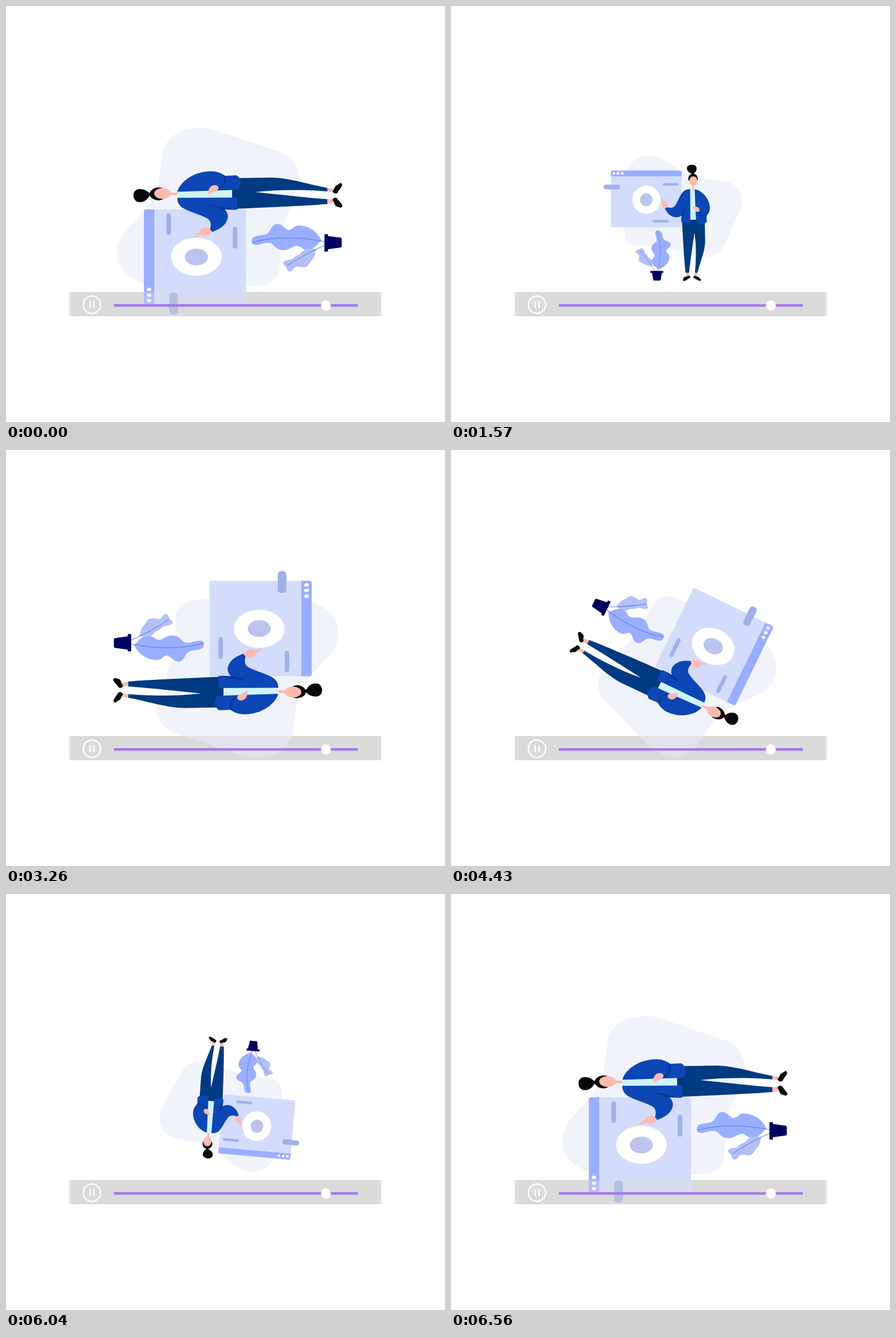
These frames come from a looping animation (761 by 720 pixels, 7650 ms). An HTML page:

```html
<!DOCTYPE html>
<html lang="en">
<head>
<meta charset="utf-8">
<title>Turning illustration</title>
<style>
  html, body { margin: 0; width: 100%; height: 100%; overflow: hidden; background: #fefefe; }
  svg { display: block; width: 761px; height: 720px; }
</style>
</head>
<body>
<svg viewBox="0 0 761 720">
  <rect x="109" y="495" width="543" height="42" fill="#efefef"/>
  <rect x="111" y="495" width="539" height="42" fill="#d9d9d9"/>

  <!-- Drawn lying on its left side, at full size -->
  <g id="scene">
    <path fill="#edf0f9" fill-opacity=".7" d="M272 253C278 224 305 211 337 211C352 211 362 215 374 219L475 253C500 262 509 280 508 303C504 325 480 372 476 405C474 425 475 440 474 453C473 475 456 485 430 485H260C225 482 193 460 193 428C193 405 204 393 216 380C240 355 262 330 266 295Z"/>

    <g id="window">
      <rect x="239" y="352" width="177" height="165" rx="4" fill="#d3dcfb"/>
      <path fill="#9aaeff" d="M257 352V517H243Q239 517 239 513V356Q239 352 243 352Z"/>
      <g fill="#fff">
        <ellipse cx="248" cy="490.5" rx="4" ry="3"/>
        <ellipse cx="248" cy="500.5" rx="4" ry="3"/>
        <ellipse cx="248" cy="510" rx="4" ry="3"/>
        <ellipse cx="330" cy="434" rx="44" ry="33"/>
      </g>
      <ellipse cx="330" cy="434.5" rx="20" ry="14.5" fill="#bbc4ec"/>
      <g fill="#9fb1e6">
        <rect x="278" y="359" width="8" height="37" rx="4"/>
        <rect x="393" y="382" width="8" height="38" rx="4"/>
        <rect x="283" y="496" width="15" height="38" rx="6"/>
      </g>
    </g>

    <g id="plant">
      <path fill="#9aaeff" d="M547 406C542 395 529 380 507 380C498 380 498 387 490 388C483 387 479 377 469 377C461 379 460 386 456 391C449 399 436 395 428 401C425 405 425 411 429 413C439 415 444 410 454 410C465 409 465 422 480 422.500C493 423 495 415 504 415C511 415 514 423 524 422C535 421 539 412 547 406Z"/>
      <path fill="#b3c0f6" d="M538 421C526 418 516 421 512 427C508 432 503 430 498 437C492 440 482 439 480 445C482 449 486 449 487 456C490 462 496 460 499 454C505 448 510 453 517 452C525 451 525 445 529 441C535 436 536 428 538 421Z"/>
      <path fill="none" stroke="#5474e0" d="M427 409Q482 394 553 408M487 450Q520 428 553 414"/>
      <path fill="#00005f" d="M552 395H558V398L580 401Q582 401 582 404V415Q582 418 580 418L558 421V425H552Z"/>
    </g>

    <g id="person">
      <path fill="#003a80" d="M392 298L460 297C490 297 525 309 558 315V321C520 318 475 317 432 322C470 326 515 331 558 334.500V342.500C535 345 480 347.500 398 351L392 340Z"/>
      <path fill="#ffb9b0" d="M557 315L568 316V322L557 321ZM557 335L568 334V341L557 342ZM284 323H299V327.5H284Z"/>
      <path fill="#080808" d="M566 320C570 318 569 311 574 310L580 306Q584 308 582 312L574 324Q568 326 566 320ZM566 336C570 339 568 344 573 347L580 349Q585 348 582 343L573 332Q567 331 566 336Z"/>

      <path fill="#080808" d="M221 328C221 320 227 316 234 317C241 317 245 321 249 324C251 317 258 314 266 314C272 314 276 317 276 325C276 333 272 336 264 336.500C257 336 252 333 249 328C246 333 242 339 233 339.500C226 340 221 335 221 328Z"/>
      <ellipse cx="271.500" cy="324.500" rx="14.500" ry="9.500" fill="#ffb9b0"/>

      <path fill="#d0f2fa" d="M297 321L392 318V333H297Z"/>
      <path fill="#0d47b5" d="M297 321.500C303 301 330 286 355 286C366 286 374 289 379 294L399 293C407 297 410 308 403 317L392 318.500Z"/>
      <path fill="#0d47b5" d="M297 332L401 331.500V352.500L377 350C384 356 386 363 384 369C380 381 369 387 357 391L353 388C357 377 355 370 346 366C334 360 320 357 309 351C300 346 297 340 297 332Z"/>
      <path fill="#06388f" d="M376 291C381 302 377 310 367 316L371 317C381 311 383 302 380 294ZM348 343L377 352L400 353L378 348Z"/>
      <path fill="#ffb9b0" d="M351 327C349 318 354 309 363 310C369 311 370 316 366 319C360 321 356 325 351 327Z"/>
      <path fill="#ffb9b0" d="M326 398L337 390C339 383 350 380 357 390C353 398 345 400 339 396L327 400Z"/>
    </g>
  </g>

  <rect x="111" y="495" width="539" height="42" fill="#dbdbdb" fill-opacity=".35"/>
  <g id="controls">
    <circle cx="149" cy="517" r="15" fill="none" stroke="#fff" stroke-width="2.500"/>
    <path stroke="#fff" stroke-width="2.500" d="M146 511V523M152.500 511V523"/>
    <path stroke="#a678ec" stroke-width="4.500" d="M187 518.300H610"/>
    <ellipse cx="554.500" cy="518.300" rx="8.500" ry="9" fill="#fff"/>
  </g>
</svg>
<script>
  const LOOP = 7650, STEP = 40, FIRST = 18, DURATION = 525;
  const scene = document.getElementById('scene');

  // Resting poses: centre, turn, and scale along the scene's own axes
  const big = [1, 1], small = [0.5556, 0.7424];
  const poses = [
    [388, 372.5, 0, ...big],
    [384.5, 367.5, 90, ...small],
    [381, 371, 180, ...big],
    [391.5, 363.5, 270, ...small],
    [388, 372.5, 360, ...big]
  ];
  const starts = [1050, 2740, 4350, 6040];

  // cubic-bezier(0, 0, .58, 1), solved by bisection
  function easeOut(x) {
    if (x >= 1) return 1;
    let low = 0, high = 1;
    for (let i = 0; i < 24; i++) {
      const s = (low + high) / 2;
      if (1.74 * s * s * (1 - s) + s ** 3 < x) low = s; else high = s;
    }
    return low * low * (3 - 2 * low);
  }

  function poseAt(time) {
    const i = starts.findLastIndex(start => time >= start);
    if (i < 0) return poses[0];
    const elapsed = FIRST + STEP * Math.floor((time - starts[i]) / STEP);
    const p = easeOut(elapsed / DURATION);
    return poses[i].map((from, k) => from + (poses[i + 1][k] - from) * p);
  }

  function render(time) {
    const [x, y, turn, scaleX, scaleY] = poseAt(time % LOOP);
    scene.setAttribute('transform',
      `translate(${x} ${y}) rotate(${turn}) scale(${scaleX} ${scaleY}) translate(-388 -372.5)`);
  }

  const begin = performance.now();
  function tick() {
    render(performance.now() - begin);
    requestAnimationFrame(tick);
  }
  tick();
</script>
</body>
</html>
```
